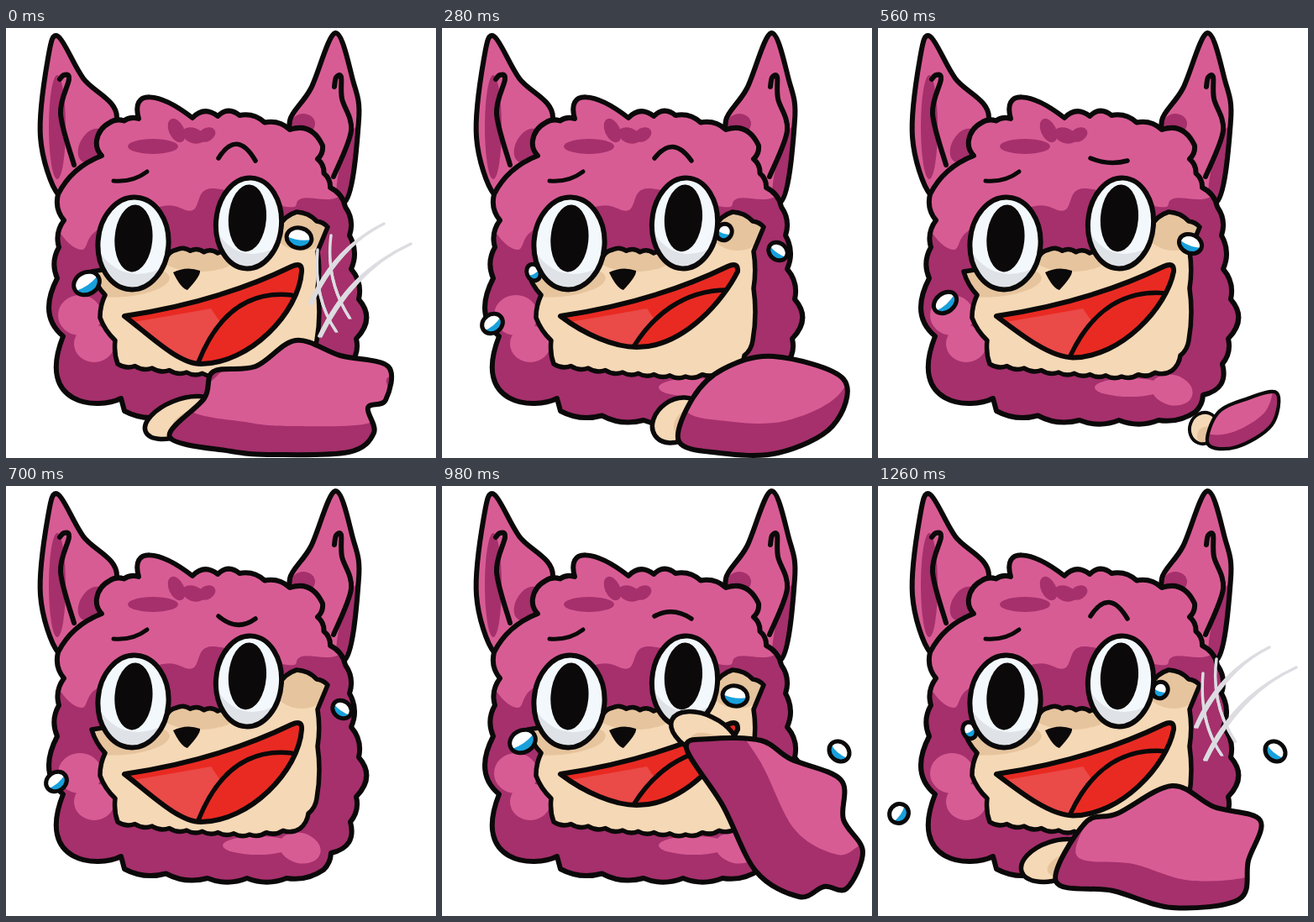
Recreate the animation shown at these times as an HTML page. Size 512x512 px, loop 1400 ms.

```html
<!DOCTYPE html>
<html>
<head>
<meta charset="utf-8">
<style>
html, body { margin: 0; width: 100%; height: 100%; overflow: hidden; background: #fff; }
svg { display: block; width: 100vw; height: 100vh; }
</style>
</head>
<body>
<svg id="stage" viewBox="0 0 512 512" stroke-linecap="round" stroke-linejoin="round"></svg>
<script>
const INK = '#0b0909', PINK = '#d85c94', PLUM = '#a5306c', SKIN = '#f5d8b5', TAN = '#e6c49d',
  RED = '#e92a22', CORAL = '#ea4a48', GREY = '#dcdce1', BLUE = '#18a0dc';
const STEP = 140, COUNT = 10;

const parse = s => s.trim().split(/\s+/).map(p => p.split(',').map(Number));

// Catmull-Rom curve through the points
function smooth(s, closed = true) {
  const p = parse(s), n = p.length;
  const at = i => closed ? p[(i + n) % n] : p[Math.max(0, Math.min(n - 1, i))];
  let d = 'M' + p[0];
  for (let i = 0; i < (closed ? n : n - 1); i++) {
    const [a, b, c, e] = [at(i - 1), at(i), at(i + 1), at(i + 2)];
    d += `C${b[0] + (c[0] - a[0]) / 6},${b[1] + (c[1] - a[1]) / 6} ${c[0] - (e[0] - b[0]) / 6},${c[1] - (e[1] - b[1]) / 6} ${c}`;
  }
  return d + (closed ? 'Z' : '');
}

// Row of tufts about `size` wide along a polyline; `k` is how far they bulge
function tufts(s, size, k) {
  const p = parse(s);
  let d = 'L' + p[0];
  for (let i = 1; i < p.length; i++) {
    const [[x, y], [u, v]] = [p[i - 1], p[i]];
    const n = Math.max(1, Math.round(Math.hypot(u - x, v - y) / size));
    const dx = (u - x) / n, dy = (v - y) / n;
    for (let j = 0; j < n; j++) d += `q${dx / 2 + dy * k},${dy / 2 - dx * k} ${dx},${dy}`;
  }
  return d;
}

const fill = (d, c) => `<path d="${d}" fill="${c}"/>`;
const line = (d, w = 6) => `<path d="${d}" fill="none" stroke="${INK}" stroke-width="${w}"/>`;
const oval = (c, x, y, rx, ry, turn = 0) =>
  `<ellipse rx="${rx}" ry="${ry}" fill="${c}" transform="translate(${x} ${y}) rotate(${turn})"/>`;
const ring = (rx, ry) => `M${-rx},0A${rx},${ry} 0 1 1 ${rx},0A${rx},${ry} 0 1 1 ${-rx},0Z`;
const place = (x, y, turn, body) => `<g transform="translate(${x} ${y}) rotate(${turn})">${body}</g>`;

let clips = 0;
// Filled and outlined shape with shading kept inside it
function shape(d, color, inner = '', w = 6) {
  const id = 'c' + clips++;
  return `<clipPath id="${id}"><path d="${d}"/></clipPath>` + fill(d, color) +
    `<g clip-path="url(#${id})">${inner}</g>` + line(d, w);
}

function ears() {
  return shape(smooth('62,198 41,130 50,36 62,10 92,60 132,107 90,190'), PINK,
      oval(PLUM, 61, 118, 10, 62) + oval(PLUM, 102, 140, 14, 22, 30)) +
    line(smooth('64,61 69,56 75,61 65,102 81,163', false)) +
    shape(smooth('338,110 363,72 392,6 413,62 420,110 402,208 350,140'), PINK,
      oval(PLUM, 408, 168, 11, 52, 12) + oval(PLUM, 354, 114, 14, 12)) +
    line(smooth('391,70 393,59 399,58 400,84 411,122 390,177', false));
}

function head() {
  const outline = 'M62,198Q78,166 114,152' +
    tufts('114,152 108,134 123,113 158,108', 22, .25) + 'C148,72 182,76 222,107' +
    tufts('222,107 252,105 278,104', 28, .45) + tufts('278,104 338,121', 30, .25) + 'Q364,112 377,140' +
    tufts('377,140 371,156 386,190 404,213', 22, .25) +
    tufts('404,213 409,247 411,287 420,323', 40, .25) + 'Q440,346 417,370' +
    tufts('417,370 410,400', 30, .25) + 'Q418,430 387,437' +
    tufts('387,437 378,457 334,467 240,467 141,456', 46, .2) + 'L137,441C110,455 35,450 68,367Q38,342 61,298' +
    tufts('61,298 63,261 69,229 62,198', 35, .25) + 'Z';
  return shape(outline, PLUM,
    fill(smooth('40,180 62,240 90,264 110,240 187,212 222,217 245,191 335,213 352,203 405,190 395,60 100,60'), PINK) +
    oval(PLUM, 175, 141, 30, 9) + oval(PLUM, 203, 122, 9, 15, -25) + oval(PLUM, 223, 128, 14, 9, 20) + oval(PLUM, 239, 127, 11, 8, -30) +
    oval(PINK, 88, 342, 26, 24) + oval(PINK, 105, 376, 24, 22) +
    oval(PINK, 300, 428, 42, 11) + oval(PINK, 350, 431, 25, 18, 15));
}

function face() {
  const outline = 'M102,290' + tufts('190,276 203,264 252,268', 16, .3) +
    tufts('325,236 346,219 370,230 383,237', 22, .2) + tufts('383,237 371,266', 40, 0) +
    tufts('371,266 371,310 370,372', 44, .08) + tufts('370,372 350,408', 25, .2) +
    tufts('350,408 290,415 215,410 133,400', 20, .25) +
    tufts('133,400 130,372 112,345 118,318 102,290', 34, .12) + 'Z';
  return shape(outline, SKIN,
    oval(TAN, 230, 272, 46, 18) + oval(TAN, 352, 238, 34, 27) + oval(TAN, 140, 302, 55, 18, -5), 5.5);
}

function mouth(b) {
  const drop = b - 377;
  const d = `M141,343C195,335 270,318 340,284Q353,278 352,290C${335 + drop * .6},${318 + drop * .9} 290,${b} 232,${b}C205,${b} 170,365 141,343Z`;
  const tongue = `M229,${b - 2}C250,345 285,312 340,${311 + drop * .3}`;
  return shape(d, RED,
    fill(`M146,351Q200,342 244,334L255,350L229,${b}H180Z`, CORAL) +
    fill(tongue + `L352,${b}Z`, RED) + line(tongue, 5.5));
}

const eye = (x, y, rx, ry, px) => place(x, y, 4,
  shape(ring(rx, ry), '#f3f8fc', fill(`M${-rx},10Q-8,54 ${rx},24V70H${-rx}Z`, '#dfe3e8')) +
  oval(INK, px, -6, 22.5, 40));

const tear = (x, y, rx, ry, turn) => place(x, y, turn,
  shape(ring(rx, ry), '#fff', fill(`M${-rx},${ry * .1}Q0,${ry * .4} ${rx},${-ry * .1}V${ry}H${-rx}Z`, BLUE), 5));

// Both tears go through: fresh, full, sliding, flying, far; the last step is on the right only
const leftTears = [[109, 291, 8, 10, -20], [96, 304, 16, 13, -30], [80, 327, 15, 11, -38], [60, 352, 13, 11, -35], [25, 390, 12, 11, -50]];
const rightTears = [[336, 243, 9, 10, 25], [349, 250, 15, 12, 12], [372, 257, 14, 11, 25], [400, 266, 12, 10, 40], [473, 316, 13, 11, 45], [473, 316, 13, 11, 45]];
const tearSteps = ['1', '2', '03', '15', '2', '3', '04', '15', '3', '04'];
const tears = steps => [...steps].map(s =>
  [leftTears[s], rightTears[s]].filter(Boolean).map(t => tear(...t)).join('')).join('');

// Hand oval, sleeve outline, and the sleeve's offset that leaves its shaded edge
const poses = {
  low: [[207, 464, 44, 21, -22], '195,487 236,441 247,409 297,403 345,372 398,390 455,403 452,443 431,452 438,482 408,505 320,508 268,504', 22, -34],
  side: [[280, 467, 32, 24, -35], '282,492 299,440 335,406 395,391 478,418 465,474 400,506 330,506', 8, -38],
  away: [[350, 475, 24, 27, 20], '357,502 373,450 420,426 474,415 465,470 405,507', -10, -24],
  wipe: [[312, 296, 42, 23, 25], '291,312 320,301 380,303 415,325 475,350 478,397 501,435 482,479 455,477 425,489 374,459 334,380', 46, -50],
  slap: [[232, 382, 37, 24, 10], '229,403 264,367 335,352 402,354 437,390 482,440 446,475 415,505 342,479 291,446', 38, -48],
  rub: [[211, 446, 42, 23, -18], '212,471 246,402 285,390 350,357 400,382 455,398 441,446 430,492 350,502 280,482', 24, -32]
};
function arm(name, move = '') {
  const [[x, y, rx, ry, turn], sleeve, dx, dy] = poses[name], d = smooth(sleeve);
  return `<g transform="${move}">` +
    place(x, y, turn, shape(ring(rx, ry), SKIN, oval(TAN, rx * .4, ry * .4, rx * .7, ry * .6), 5.5)) +
    shape(d, PLUM, place(dx, dy, 0, fill(d, PINK))) + '</g>';
}

const slash = (x, y, cx, cy, ex, ey) =>
  fill(`M${x},${y}Q${cx - 3},${cy - 3} ${ex - 2},${ey}L${ex + 3},${ey + 2}Q${cx + 3},${cy + 3} ${x},${y}Z`, GREY) +
  `<path d="M${x},${y}Q${cx},${cy} ${ex},${ey}" fill="none" stroke="${GREY}" stroke-width="3.5"/>`;
const slashes = (dx, dy) => place(dx, dy, 0,
  slash(450, 233, 392, 262, 362, 328) + slash(482, 257, 410, 290, 373, 367) +
  slash(387, 247, 380, 300, 409, 345) + slash(371, 264, 366, 322, 393, 361));

const arms = [
  slashes(0, 0) + arm('low'), arm('low', 'translate(20 1)'), arm('side'), arm('away'),
  arm('away', 'translate(143 144) scale(.7)'), '', arm('wipe', 'translate(6 -11)'), arm('wipe'),
  slashes(24, -54) + arm('slap'), slashes(16, -41) + arm('rub')
];

const eyes = eye(151.5, 256.5, 42, 55, 0) + eye(289, 232.5, 39, 54, -2) +
  fill('M199,291Q215,283 231,289Q232,295 216,312Q208,310 199,291Z', INK) + line('M128,182Q151,184 168,171', 5);

function frame(i) {
  const jaw = 389 + 11 * Math.cos(i * Math.PI * 2 / 5);
  const arch = 120 + 54 * Math.sin(i * Math.PI / COUNT) ** 4;
  return '<g class="frame" display="none">' + mouth(jaw) + tears(tearSteps[i]) + eyes +
    line(`M253,155Q275,${arch} 297,158`, 5.5) + arms[i] + '</g>';
}

const stage = document.getElementById('stage');
stage.innerHTML = ears() + head() + face() + arms.map((_, i) => frame(i)).join('');

const layers = stage.querySelectorAll('.frame');
function tick() {
  const now = Math.floor(performance.now() / STEP) % COUNT;
  layers.forEach((g, i) => g.setAttribute('display', i === now ? 'inline' : 'none'));
  requestAnimationFrame(tick);
}
tick();
</script>
</body>
</html>
```
